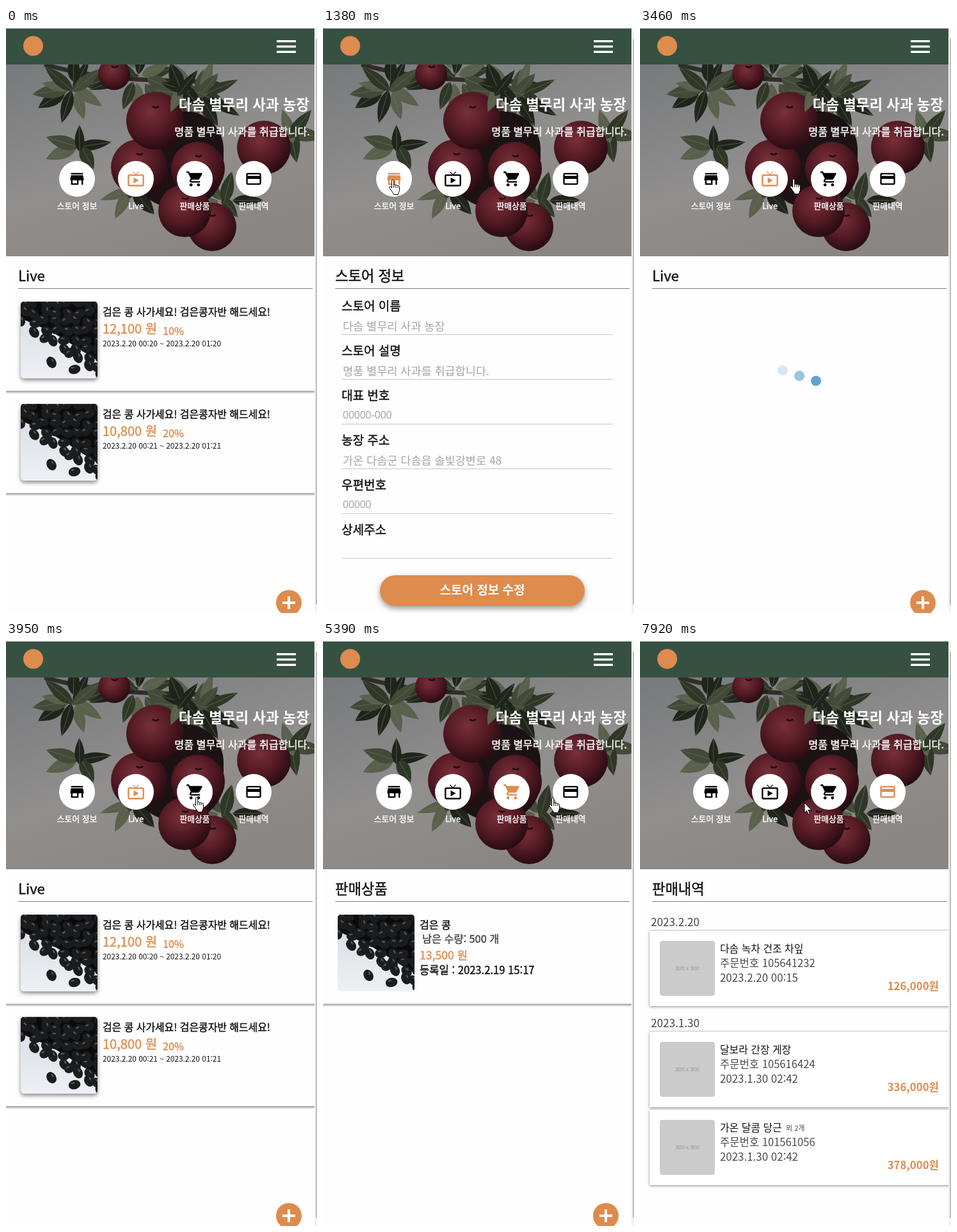
An HTML page for the animation above (7990 ms loop, 486x915 px).

```html
<!DOCTYPE html>
<html lang="ko">
<head>
<meta charset="utf-8">
<style>
  html, body { margin: 0; width: 100%; height: 100%; overflow: hidden; background: #fff; }
  svg { display: block; width: 486px; height: 915px; }
  text { font-family: "Noto Sans CJK KR", "Noto Sans CJK JP", "Noto Sans", sans-serif; white-space: pre; }
  .num { font-family: "Liberation Sans", sans-serif; }
  .thumb { filter: drop-shadow(0 3px 3px #0007); }
  .card { filter: drop-shadow(0 1px 2px #0007); }
  .button { filter: drop-shadow(0 4px 5px #0006); }
</style>
</head>
<body>
<script>
const LOOP = 7990, STEP = 68, SPIN = 550;
const ORANGE = '#de8b4e', DARK = '#111';

let seed = 7;
const rand = () => (seed = (seed * 16807) % 2147483647) / 2147483647;
const jitter = size => (rand() - .5) * size;
const times = (n, make) => Array.from({ length: n }, (_, i) => make(i)).join('');

// A thin outline stands in for the medium weight
function text(x, y, size, str, { fill = DARK, weight = 400, anchor = 'start', cls = '' } = {}) {
  const medium = weight === 500 ? `stroke="${fill}" stroke-width=".4"` : '';
  return `<text x="${x}" y="${y}" font-size="${size}" fill="${fill}" font-weight="${medium ? 400 : weight}"
    text-anchor="${anchor}" class="${cls}" ${medium}>${str}</text>`;
}
const rect = (x, y, w, h, fill, more = '') =>
  `<rect x="${x}" y="${y}" width="${w}" height="${h}" fill="${fill}" ${more}/>`;
const circle = (x, y, r, fill, more = '') =>
  `<circle cx="${x}" cy="${y}" r="${r}" fill="${fill}" ${more}/>`;
const group = (id, body, more = '') => `<g id="${id}" ${more}>${body}</g>`;

// Hero picture: sky, branch, sprays of leaves and apples
function leaf(x, y, angle) {
  const fill = ['#20251b', '#2f3727', '#434a37', '#5a604c'][Math.floor(rand() * 4)];
  const l = 20 + rand() * 10, w = 9 + rand() * 5;
  return `<g transform="translate(${x} ${y}) rotate(${angle})">
    <path d="M${-l} 0Q${-l / 3} ${-w * 1.6} ${l} 0Q${-l / 3} ${w * 1.6} ${-l} 0" fill="${fill}"/>
    <path d="M${-l} 0H${l}" stroke="#6b7260" stroke-width=".6"/></g>`;
}
const spray = (x, y, count, spread) => times(count, i => {
  const a = i / count * 360 + jitter(40), r = spread * (.4 + rand() * .6), rad = a * Math.PI / 180;
  return leaf(x + Math.cos(rad) * r, y + Math.sin(rad) * r * .8, a);
});
const apple = (x, y, r) => circle(x, y, r, 'url(#apple)') +
  `<path d="M${x - 4} ${y - r * .5}q5 4 10 0" stroke="#1d0c10" stroke-width="2.5" fill="none"/>`;

const hero = rect(0, 57, 482, 300, 'url(#sky)') +
  '<path d="M60 57Q140 80 245 82T330 92M230 90Q300 130 325 200" fill="none" stroke="#332d28" stroke-width="7"/>' +
  spray(105, 95, 11, 45) + spray(205, 75, 12, 55) + spray(300, 105, 15, 48) +
  spray(115, 185, 5, 32) + spray(195, 255, 6, 38) + spray(340, 270, 5, 38) + spray(445, 165, 6, 32) +
  rect(200, 130, 140, 150, '#1c1214', 'rx="60"') +
  apple(169, 72, 25) + apple(208, 218, 44) + apple(300, 220, 42) + apple(233, 145, 45) +
  apple(322, 311, 38) + apple(403, 187, 42) + apple(279, 286, 41) +
  spray(275, 95, 6, 28);

// Bean picture, 120 x 120: a heap above a slanted line and a few strays
function bean(x, y) {
  return `<g transform="translate(${x} ${y}) rotate(${rand() * 120 - 40})">
    <ellipse rx="9.4" ry="7.2" fill="#1b1c1e"/><ellipse cx="-2" cy="-3" rx="3" ry="1.2" fill="#55565a"/></g>`;
}
let beans = rect(0, 0, 120, 120, 'url(#plate)') + '<path d="M0 0H120V92L50 48 0 26Z" fill="#0b0b0c"/>';
for (let y = 3; y < 125; y += 14)
  for (let x = 3; x < 125; x += 17)
    if (x > (y - 36) * 1.5) beans += bean(x + jitter(8), y + jitter(6));
beans += bean(48, 95) + bean(77, 80) + bean(84, 106);
const thumb = (y, cls) => `<g class="${cls}"><use href="#beans" x="23" y="${y}"/></g>`;

const heading = str => text(19, 396, 22.2, str, { weight: 500 }) + rect(19, 407, 460, 1, '#7d7d7d');
const divider = y => rect(0, y, 482, 5, 'url(#edge)');
const medium = { weight: 500 }, price = { fill: ORANGE, weight: 500 };

const liveItem = (y, won, off, min) => thumb(y, 'thumb') +
  text(151, y + 22, 15.9, '검은 콩 사가세요! 검은콩자반 해드세요!', medium) +
  text(151, y + 50, 20, won + ' 원', price) + text(245, y + 52, 16.3, off + '%', price) +
  text(151, y + 70, 11.9, `2023.2.20 00:${min} ~ 2023.2.20 01:${min}`) + divider(y + 139);

const FIELDS = [
  ['스토어 이름', '다솜 별무리 사과 농장'], ['스토어 설명', '명품 별무리 사과를 취급합니다.'],
  ['대표 번호', '00000-000'], ['농장 주소', '가온 다솜군 다솜읍 솔빛강변로 48'],
  ['우편번호', '00000'], ['상세주소', '']
];
const infoPage = heading('스토어 정보') + FIELDS.map(([label, value], i) => {
  const y = 442 + i * 70, plain = /^[\d-]+$/.test(value);
  return text(29, y, 19, label, medium) +
    text(31, y + (plain ? 29 : 31), plain ? 16 : 17.5, value, { fill: '#a6a6a6', cls: plain ? 'num' : '' }) +
    rect(29, y + 37, 424, 1, '#c6c6c6');
}).join('') + rect(89, 856, 320, 48, ORANGE, 'rx="24" class="button"') +
  text(249, 886, 19, '스토어 정보 수정', { fill: '#fff', weight: 700, anchor: 'middle' });

const productList = thumb(428, '') + text(151, 450, 16.1, '검은 콩', medium) +
  text(155, 472, 16.3, '남은 수량: 500 개', { fill: '#444', weight: 500 }) +
  text(151, 498, 17.6, '13,500 원', price) +
  text(151, 521, 16.6, '등록일 : 2023.2.19 15:17', medium) + divider(567);

const thin = { fill: '#484848', weight: 300 };
const order = (y, name, number, date, won, extra = '') =>
  rect(15, y + 1, 490, 118, '#fff', 'class="card"') + rect(15, y, 468, 1, '#cfcfcf') +
  rect(31, y + 17, 86, 86, '#cbcbcb', 'rx="4"') +
  text(74, y + 63, 8.6, '300 x 300', { fill: '#969696', anchor: 'middle', cls: 'num' }) +
  text(125, y + 35, 15.9, name) + text(228, y + 34, 11, extra, thin) +
  text(125, y + 58, 16.6, '주문번호 ' + number, thin) + text(125, y + 81, 16.9, date, thin) +
  text(467, y + 94, 16.8, won + '원', { fill: ORANGE, weight: 700, anchor: 'end' });
const historyPage = heading('판매내역') +
  text(17, 446, 17.1, '2023.2.20', { fill: '#444' }) +
  order(452, '다솜 녹차 건조 차잎', '105641232', '2023.2.20 00:15', '126,000') +
  text(17, 604, 17.1, '2023.1.30', { fill: '#444' }) +
  order(610, '달보라 간장 게장', '105616424', '2023.1.30 02:42', '336,000') +
  order(732, '가온 달콤 당근', '101561056', '2023.1.30 02:42', '378,000', '외 2개');

// Tab icons on a 24-unit square
const outline = (x, y, w, h) => rect(x, y, w, h, 'none', 'rx="1" stroke-width="2"');
const TABS = [
  ['info', '스토어 정보', '<path d="M4 4h16v2H4zM4 7h16l1 5v2h-1v6h-2v-6h-4v6H4v-6H3v-2zM6 14v4h6v-4z" stroke="none"/>'],
  ['live', 'Live', outline(2, 7, 20, 14) + '<path d="M9 10v8l7-4z" stroke="none"/><path d="M8 2.4l4 4 4-4" fill="none"/>'],
  ['products', '판매상품', '<path d="M5.2 4H21q1.2.3.9 1.5L18 12.5q-.6.5-1.5.5H8l-1 2h12v2H7q-2.600-.6-1.800-3L6.600 11.600 3 4H1V2h3.300z" stroke="none"/>' +
    [7, 17].map(x => `<circle cx="${x}" cy="20" r="2" stroke="none"/>`).join('')],
  ['history', '판매내역', outline(3, 5, 18, 14) + '<path d="M3 8h18v4H3z" stroke="none"/>']
];
const tabs = TABS.map(([id, label, icon], i) => {
  const x = 111 + i * 92;
  return circle(x, 236, 28, '#fff') +
    group(id + 'Icon', icon, `transform="translate(${x - 14} 222) scale(${28 / 24})"`) +
    text(x, 283, 12.8, label, { fill: '#fff', anchor: 'middle', weight: 500 });
}).join('');

const stop = (at, color) => `<stop offset="${at}" stop-color="${color}"/>`;
document.body.innerHTML = `<svg viewBox="0 0 486 915">
<defs>
  <linearGradient id="sky" x2=".5" y2="1">${stop(0, '#77797c') + stop(.6, '#918f8e') + stop(1, '#8a8683')}</linearGradient>
  <radialGradient id="apple" cx=".42" cy=".36" r=".68">${stop(0, '#783039') + stop(.5, '#561b25') + stop(1, '#230a0f')}</radialGradient>
  <linearGradient id="plate" x2="0" y2="1">${stop(0, '#d5d9e0') + stop(1, '#eef0f5')}</linearGradient>
  <linearGradient id="edge" x2="0" y2="1">${stop(0, '#dcdcdc') + stop(.3, '#a8a8a8') + stop(1, '#fefefe')}</linearGradient>
  <clipPath id="page"><path d="M0 0H482V915H0Z"/></clipPath>
  <clipPath id="heroBox"><path d="M0 57H482V357H0Z"/></clipPath>
  <clipPath id="round"><rect width="120" height="120" rx="5"/></clipPath>
  ${group('beans', beans, 'clip-path="url(#round)"')}
</defs>
${rect(0, 0, 486, 915, '#fefefe')}
<g clip-path="url(#page)">
  ${rect(0, 0, 482, 57, '#365142')}${rect(0, 0, 482, 1, '#c9cdca')}
  ${circle(42.5, 28, 15.5, ORANGE)}
  ${times(3, i => rect(423, 19 + i * 8.35, 30, 3.3, '#fff'))}
  <g clip-path="url(#heroBox)">${hero}</g>
  ${text(474, 128, 22.4, '다솜 별무리 사과 농장', { fill: '#fff', weight: 700, anchor: 'end' })}
  ${text(475, 168, 16.2, '명품 별무리 사과를 취급합니다.', { fill: '#fff', weight: 500, anchor: 'end' })}
  ${tabs}
  ${group('live', heading('Live'))}
  ${group('liveList', liveItem(428, '12,100', 10, 20) + liveItem(588, '10,800', 20, 21))}
  ${group('info', infoPage)}
  ${group('products', heading('판매상품'))}
  ${group('productsList', productList)}
  ${group('history', historyPage)}
  ${group('loader', times(3, i => circle(223 + i * 26, 0, 8, '#5fa5d2')))}
  ${group('add', circle(442, 899, 20, ORANGE) + rect(432, 897, 20, 4, '#fff') + rect(440, 889, 4, 20, '#fff'))}
</g>
${rect(482, 0, 4, 915, '#f3f3f3')}${rect(484, 17, 2, 885, '#bdbdbd')}
${circle(0, 0, 12, '#f7e838', 'id="click" opacity=".78"')}
${group('hand', `<path d="M-1.5 2c0-2 3.2-2 3.2 0v7c.5-1.6 3-1.4 3.2.4.6-1.3 2.9-1 3 .7.6-1 2.6-.6 2.6 1.2v5c0 3-2 4-2 7.2h-7c0-2-2.5-4-4.5-7.5L-5.2 13c-.9-1.6 1.2-2.8 2.4-1.4l1.3 1.6z"/>
  <path d="M1.7 9v4M4.9 9.5V13M7.9 10.5V13" fill="none"/>`, 'fill="#fff" stroke="#000"')}
${group('arrow', '<path d="M0 0v16l3.6-3.5 2.4 5.7 2.4-1-2.4-5.6h5z"/>', 'fill="#fff" stroke="#000"')}
</svg>`;

const $ = id => document.getElementById(id);
const show = (id, on) => { $(id).style.display = on ? '' : 'none'; };
const place = (id, [x, y]) => $(id).setAttribute('transform', `translate(${x} ${y})`);
const during = (t, spans) => spans.some(([from, to]) => t >= from && t < to);

// start, page, resting height of the loading dots
const PAGES = [[-SPIN, 'live'], [1380, 'info'], [2980, 'live', 552], [4430, 'products', 532], [5980, 'history']];
const CLICKS = [[1240, 1380], [2710, 2980], [4170, 4500], [5850, 5980]];
// leave, arrive, x, y
const MOVES = [
  [0, 400, 452, 898], [400, 880, 24, 560], [880, 1110, 109, 237], [1972, 2310, 207, 234],
  [3390, 3800, 337, 243], [3800, 4020, 290, 244], [5182, 5590, 388, 246],
  [7172, 7720, 245, 258], [7792, 7920, 257, 253]
];

// Moves in held steps and slows towards each stop
function cursorAt(t) {
  const i = MOVES.findLastIndex(m => m[0] <= t);
  const [leave, arrive, x, y] = MOVES[i], [, , x0, y0] = MOVES[i - 1] || MOVES[i];
  const p = t >= arrive ? 1 : Math.floor((t - leave) / STEP) * STEP / (arrive - leave);
  const k = Math.sin(p * Math.PI / 2);
  return [Math.round(x0 + (x - x0) * k), Math.round(y0 + (y - y0) * k)];
}

function bounce(age, rest) {
  [...$('loader').children].forEach((dot, i) => {
    const phase = Math.max(0, Math.floor(age / STEP) * STEP - i * 200) / 600 % 2;
    const rise = Math.sin(phase * Math.PI / 2) ** 1.4;
    dot.setAttribute('cy', rest - 20 * rise);
    dot.setAttribute('opacity', 1 - .9 * rise);
  });
}

function draw(t) {
  const [since, page, rest] = PAGES.findLast(p => p[0] <= t);
  const loaded = t - since >= SPIN;
  for (const [id] of TABS) {
    const color = id === page ? ORANGE : '#000';
    show(id, id === page);
    $(id + 'Icon').setAttribute('fill', color);
    $(id + 'Icon').setAttribute('stroke', color);
  }
  for (const id of ['live', 'products']) show(id + 'List', id === page && loaded);
  show('add', page === 'live' || page === 'products');
  show('loader', rest && !loaded);
  if (rest) bounce(t - since - STEP, rest);

  const pointing = t >= 1040 && t < 7240, cursor = cursorAt(t);
  show('hand', pointing);
  show('arrow', t >= 400 && !pointing);
  show('click', during(t, CLICKS));
  for (const id of ['hand', 'arrow', 'click']) place(id, cursor);
}

const start = performance.now();
function tick() {
  draw((performance.now() - start) % LOOP);
  requestAnimationFrame(tick);
}
tick();
</script>
</body>
</html>
```
